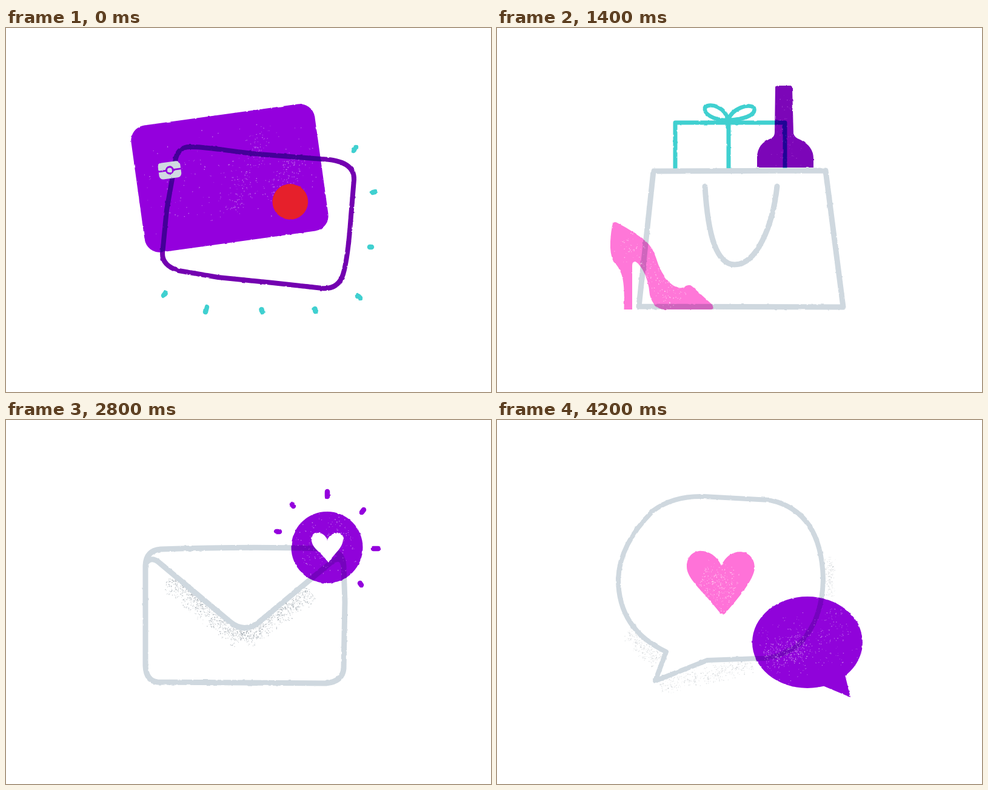
Write an HTML page with a canvas that moves like this. It is 800 px wide and 600 px high and loops after 4.9 s.

```html
<!DOCTYPE html>
<html lang="en">
<head>
<meta charset="utf-8">
<title>Card stories</title>
<style>
  html, body { margin: 0; width: 100%; height: 100%; overflow: hidden; background: #fff; }
  canvas { display: block; filter: url(#rough); }
  svg { position: absolute; }
</style>
</head>
<body>
<svg width="0" height="0">
  <filter id="rough" x="0" y="0" width="100%" height="100%" color-interpolation-filters="sRGB">
    <feTurbulence type="fractalNoise" baseFrequency=".12" numOctaves="2" seed="4"/>
    <feDisplacementMap in="SourceGraphic" scale="2.5" xChannelSelector="R" yChannelSelector="G"/>
  </filter>
</svg>
<canvas width="800" height="600"></canvas>
<script>
const HOLD = 700;
const GREY = '#cfd8df', PURPLE = '#9400dd', PINK = '#ff77d8', TEAL = '#40d0d0';
const NAVY = '#0c1254', CORAL = '#ff6a66', PLUM = '#7300b0';
const ctx = document.querySelector('canvas').getContext('2d');
ctx.lineCap = ctx.lineJoin = 'round';

let seed;
function random() {
  seed = (seed * 16807) % 2147483647;
  return seed / 2147483647;
}

function fill(color, d) {
  ctx.fillStyle = color;
  ctx.fill(new Path2D(d));
}

function line(color, width, d) {
  ctx.strokeStyle = color;
  ctx.lineWidth = width;
  ctx.stroke(new Path2D(d));
}

function ellipse(x, y, rx, ry = rx) {
  return `M${x - rx} ${y}a${rx} ${ry} 0 1 1 ${2 * rx} 0a${rx} ${ry} 0 1 1 ${-2 * rx} 0z`;
}

function box(color, x, y, w, h, r) {
  ctx.fillStyle = color;
  ctx.beginPath();
  ctx.roundRect(x, y, w, h, r);
  ctx.fill();
}

function multiply(draw) {
  ctx.globalCompositeOperation = 'multiply';
  draw();
  ctx.globalCompositeOperation = 'source-over';
}

// Scatter dots around a segment, densest along its middle line.
function spray(color, count, x1, y1, x2, y2, spread) {
  ctx.fillStyle = color;
  const length = Math.hypot(x2 - x1, y2 - y1);
  for (let i = 0; i < count; i++) {
    const along = random(), side = (random() + random() - 1) * spread / length, size = .6 + random() * .9;
    ctx.fillRect(x1 + (x2 - x1) * along - (y2 - y1) * side,
                 y1 + (y2 - y1) * along + (x2 - x1) * side, size, size);
  }
}

function grain(d, color, count, ...segment) {
  ctx.save();
  ctx.clip(new Path2D(d));
  spray(color, count, ...segment);
  ctx.restore();
}

function at(x, y, degrees, scale, draw) {
  ctx.save();
  ctx.translate(x, y);
  ctx.rotate(degrees * Math.PI / 180);
  ctx.scale(scale, scale);
  draw();
  ctx.restore();
}

function cardBody(color = PURPLE) {
  box(color, -140.5, -97, 281, 194, 23);
  const light = 'rgba(255,255,255,.4)';
  spray(light, 170, -130, 0, 130, 0, 88);
  spray(light, 150, 0, 50, 65, -75, 22);
  spray(light, 120, 55, 45, 105, -20, 24);
}

function cardMarks() {
  box('#d0d9e1', -105.5, -37, 34, 25, 6);
  line(PURPLE, 2.6, 'M-105-24.5H-72');
  fill('#d0d9e1', ellipse(-88.5, -24.5, 5));
  line(PURPLE, 2.8, ellipse(-88.5, -24.5, 5));
  fill('#e6202b', ellipse(86, 48, 27));
}

function card(color) {
  cardBody(color);
  cardMarks();
}

function outlineCard() {
  at(369, 247.5, -7.9, 1.088, cardBody);
  multiply(() => line(PLUM, 8, `M305 196C340 196 375 205 430 209L520 216Q575 218 574 250
    L569 310Q564 380 556 406Q548 431 522 429L440 420L350 411L285 400Q258 392 258 372L265 300L280 215Q285 195 305 196z`));
  at(369, 247.5, -7.9, 1.088, cardMarks);
  line(TEAL, 8.5, `M573 202L577 197M605 271L609 270M600 361H603M580 441L584 445M260 441L263 437
    M329 468L331 460M421.5 464L422.5 468M509.5 463L510.5 467`);
}

function helpDesk() {
  line(GREY, 6, 'M201 395H296M410 394H500C555 394 590 430 600 472M280 398C290 435 318 456 350 456C387 456 418 434 424 398');
  fill('#6d0ba6', `M296 291Q292 270 291 200C295 150 325 130 365 128Q395 127 420 130Q445 125 462 125
    C483 129 493 141 493 157C492 176 480 188 465 192Q460 208 444 212L380 180z`);
  spray('rgba(170,80,225,.6)', 60, 395, 138, 480, 155, 18);
  const face = `M296 290L352 235L370 188L443 188V240Q454 254 455 260Q452 266 442 265L443 274H418Q424 287 442 291
    L438 319Q437 329 428 329L412 331Q408 332 408 340V405C390 447 315 447 297 405z`;
  fill('#a400f0', face);
  grain(face, 'rgba(210,120,255,.5)', 350, 345, 200, 345, 430, 75);
  grain(face, 'rgba(75,0,150,.6)', 280, 352, 332, 408, 342, 22);
  fill('#110c5a', `M296 291L294 205C298 168 340 146 385 146C425 148 443 170 443 191Q405 200 370 190
    L352 237L309 288z`);
  spray('rgba(110,50,190,.55)', 170, 306, 275, 350, 175, 30);
  line('#110c5a', 5.5, 'M407 236Q417 245 426 234');
  line(CORAL, 6.5, 'M311 147Q300 129 287 139Q278 147 286 166L314 236M441 313L462 326Q475 333 481 320L484 309');
  box(CORAL, 311, 226, 39, 49, 17);
  fill(CORAL, 'M482 292L492 291Q496 293 495 298L493 309Q490 313 485 312Q478 310 478 305z');
  fill(GREY, ellipse(549, 224, 38) + 'M550 262L505 264L519 247z');
  line('#fff', 5, 'M529 216H556M529 226H573M529 236H551');
}

function shopping() {
  const bottle = `M459 98Q459 95 463 95H483Q487 95 487 99L489 174Q491 181 500 184Q522 195 522 215V230H429V212
    Q430 190 452 182Q458 179 458 172z`;
  fill('#7c06b8', bottle);
  grain(bottle, 'rgba(190,100,225,.5)', 90, 470, 110, 490, 228, 35);
  ctx.lineCap = 'butt';
  multiply(() => line(TEAL, 7, 'M294 232V156H475V232M382 153V232'));
  ctx.lineCap = 'round';
  line(TEAL, 6.5, 'M381 152C355 152 341 141 343 131C352 122 377 131 381 152C388 132 417 123 424 132C428 144 405 151 381 152');
  line(GREY, 9, 'M258 236L542 235L571 460L234 459zM343 261C348 345 363 390 392 390C429 390 455 325 462 261');
  const shoe = `M191 322Q194 318 200 322Q225 335 246 352Q257 362 262 378Q270 405 285 420Q299 432 309 427Q317 421 322 426
    L355 456Q359 464 353 464H275Q258 462 252 440Q250 415 240 398Q232 386 228 385Q223 385 223 392V464H209.5
    Q211 420 205 405Q200 392 192 385Q186 372 187 352Q188 334 191 322z`;
  multiply(() => fill(PINK, shoe));
  grain(shoe, 'rgba(255,235,250,.65)', 180, 205, 350, 300, 450, 32);
}

function parachute() {
  line(GREY, 8, 'M245 190Q300 232 345 257L401 289L455 257Q500 232 553 187M348 188L401 289L460 188');
  const canopy = `M239 189Q237 184 243 173C268 107 328 75 404 75C480 74 545 120 562 184Q515 158 464 187
    Q408 152 346 187Q290 151 239 189z`;
  fill('#abfeff', canopy);
  fill('#76efef', 'M345 187C345 130 370 77 404 75C440 76 465 140 465 187Q408 152 345 187z');
  grain(canopy, 'rgba(255,255,255,.5)', 260, 270, 155, 530, 115, 55);
  at(400.5, 389, 0, 1, card);
}

function envelope() {
  spray('rgba(125,135,145,.5)', 850, 268, 260, 390, 360, 24);
  spray('rgba(125,135,145,.5)', 750, 390, 360, 500, 280, 24);
  fill('#fff', 'M245 233L370 333Q392 352 415 335L540 231z');
  line(GREY, 9, `M255 213Q400 208 525 212Q556 215 557 240L559 300L557 410Q555 431 528 434L250 432Q231 430 230 405
    V240Q231 215 255 213zM231 236Q240 223 255 237L370 333Q392 351 415 335L538 233Q553 223 557 240`);
  const badge = ellipse(529.5, 210, 59);
  multiply(() => fill('#9003da', badge));
  grain(badge, 'rgba(255,255,255,.45)', 180, 485, 220, 570, 185, 60);
  fill('#fff', `M532 235C518 216 504 211 504 197C504 182 526 182 530 199C534 183 556 183 556 196C556 211 542 219 532 235z`);
  line(PURPLE, 8.5, 'M530 118V126M472 139L474 142M446 184H451M587 152L590 148M606 212H614M584 269L586 272');
}

function skater() {
  const legs = `M347 372H383L377 459L394 464L396 472H341zM401 368H437L431 458Q455 465 455 470L396 472z`;
  fill(PINK, legs);
  grain(legs, 'rgba(190,20,140,.6)', 450, 340, 384, 440, 380, 22);
  grain(legs, 'rgba(255,235,250,.6)', 90, 345, 450, 440, 450, 40);
  line('#4bd5d2', 7, 'M303 178Q308 155 340 149L366 144M397 137Q450 133 474 154');
  fill(PINK, `M380 104Q394 102 404 94L407 101Q410 106 410 108L407 110L408 117Q409 125 402 126H394V145
    Q390 153 381 153Q370 152 368 143L375 125z`);
  fill('#fff', 'M397 111L408 113L407 117Q400 117 397 111z');
  fill(NAVY, `M319 136C325 118 340 110 356 108C362 90 378 78 395 82Q405 86 404 97Q397 106 384 107
    Q379 102 380 111L379 137Q372 141 366 142L352 147Q340 141 319 136z`);
  at(411, 269.5, -7.9, 1.088, () => card('#9610dd'));
  fill(PINK, `M538 203L554 192Q560 189 560 196L562 213Q555 218 538 206zM256 302Q257 297 262 300L275 310
    Q278 314 266 327Q260 331 258 323z`);
  line(NAVY, 7.5, 'M293 465Q305 476 318 476H478Q491 475 502 465');
  line(NAVY, 6.5, ellipse(342, 489.5, 6.3) + ellipse(460, 490.5, 6.3));
}

function chat() {
  const shade = 'rgba(125,135,145,.25)';
  spray(shade, 140, 548, 225, 550, 290, 10);
  spray(shade, 240, 215, 348, 265, 396, 18);
  spray(shade, 400, 268, 438, 420, 402, 18);
  const bubble = `M347 396L261 430L279 382Q200 345 200 262Q202 205 257 150Q290 125 340 126L450 132Q535 150 538 262
    Q537 330 498 370Q465 394 430 393z`;
  fill('#fff', bubble);
  line(GREY, 8, bubble);
  const heart = `M376 319Q372 323 367 317C340 282 313 262 313 242C313 208 355 207 370 240C384 207 425 211 425 244
    C424 262 400 292 376 319z`;
  fill('#ff72d8', heart);
  grain(heart, 'rgba(255,235,250,.6)', 280, 335, 260, 390, 285, 40);
  const reply = ellipse(512, 366.5, 91, 75.5) + 'M574 420L583 457L535 437z';
  multiply(() => fill('#9003da', reply));
  grain(reply, 'rgba(255,255,255,.4)', 300, 440, 390, 580, 340, 60);
  grain(reply, 'rgba(255,255,255,.5)', 240, 440, 395, 510, 370, 25);
}

const scenes = [outlineCard, helpDesk, shopping, parachute, envelope, skater, chat];
let shown = -1;

function tick() {
  const current = Math.floor(performance.now() / HOLD) % scenes.length;
  if (current !== shown) {
    shown = current;
    seed = 1234 + current;
    ctx.clearRect(0, 0, 800, 600);
    scenes[current]();
  }
  requestAnimationFrame(tick);
}
tick();
</script>
</body>
</html>
```
